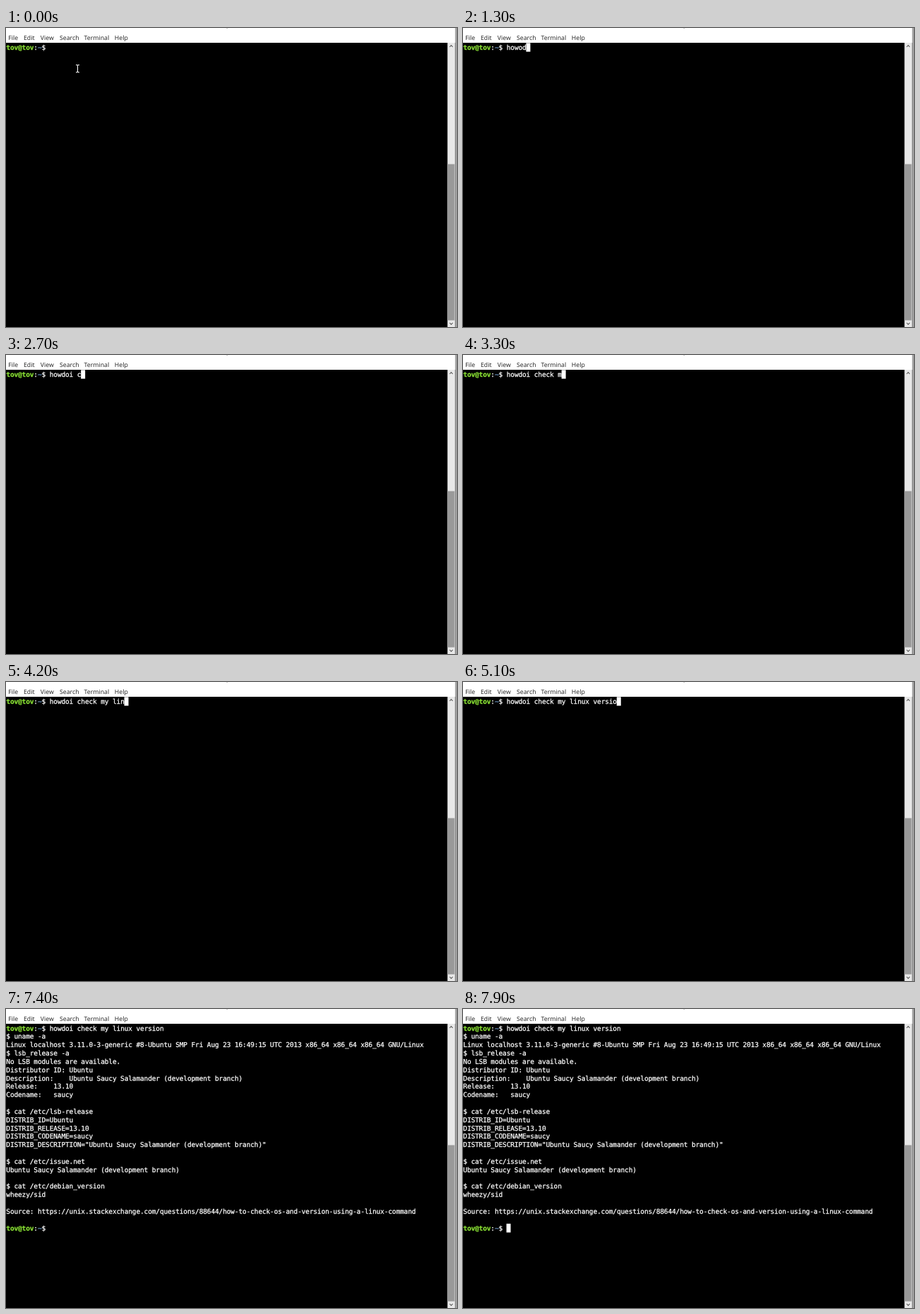
Animation of 639 by 425 pixels, one loop 8 s. Source, as an HTML page:

```html
<!DOCTYPE html>
<html lang="en">
<head>
<meta charset="utf-8">
<title>Terminal</title>
<style>
  html, body { margin: 0; width: 100%; height: 100%; overflow: hidden; background: #000; }
  svg { display: block; width: 639px; height: 425px; }
  text { white-space: pre; text-rendering: geometricPrecision; }
  .menu { font: 8.7px "Noto Sans", sans-serif; fill: #2b2b2b; }
  .term {
    font: 9.5px "DejaVu Sans Mono", monospace; letter-spacing: -.14px;
    fill: #fff; stroke: #fff; stroke-width: .25px;
  }
  .user { font-weight: bold; fill: #8ae234; stroke: #8ae234; }
  .path { fill: #729fcf; stroke: #729fcf; }
</style>
</head>
<body>
<svg viewBox="0 0 639 425">
  <rect width="639" height="425"/>
  <rect width="639" height="21" fill="#fff"/>
  <rect x="312.5" width="1.5" height="1" fill="#bbb"/>
  <g class="menu">
    <text x="3.3" y="16.6">File</text>
    <text x="25" y="16.6">Edit</text>
    <text x="48.8" y="16.6">View</text>
    <text x="76" y="16.6">Search</text>
    <text x="110.6" y="16.6">Terminal</text>
    <text x="153.8" y="16.6">Help</text>
  </g>

  <g id="scrollbar">
    <rect x="625.5" y="21" width="11" height="404" fill="#e8e8e8"/>
    <rect x="625.5" y="193.5" width="10" height="222" fill="#999"/>
    <path d="M628.6 27l2.2-2.4 2.2 2.4M628.6 419l2.2 2.4 2.2-2.4" fill="none" stroke="#555" stroke-width="1.1"/>
    <rect x="636.4" width="2.6" height="425" fill="#a0a0a0"/>
  </g>

  <g class="term" id="term"></g>
  <rect id="caret" width="6" height="12.4" fill="#fff"/>
  <path id="pointer" d="M99 52.5h1.6l.9.8.9-.8H104M101.5 53v9.5M99 63h1.6l.9-.8.9.8H104" fill="none" stroke="#fff" stroke-width="1.1"/>
</svg>
<script>
  const LOOP = 8000, CELL = 5.58, ROW = 11.83, PROMPT = 11;
  const RUN = 5900, OUTPUT = 7400;

  // [time, command line so far]
  const typing = [
    [0, ''], [900, 'h'], [1000, 'how'], [1300, 'howod'], [1600, 'howo'],
    [1900, 'howdo'], [2400, 'howdoi'], [2600, 'howdoi '], [2700, 'howdoi c'],
    [2800, 'howdoi che'], [2900, 'howdoi chec'], [3100, 'howdoi check'],
    [3200, 'howdoi check '], [3300, 'howdoi check m'], [3400, 'howdoi check my '],
    [3700, 'howdoi check my li'], [4200, 'howdoi check my lin'],
    [4400, 'howdoi check my linux'], [4600, 'howdoi check my linux '],
    [4700, 'howdoi check my linux ve'], [4900, 'howdoi check my linux ver'],
    [5000, 'howdoi check my linux vers'], [5100, 'howdoi check my linux versio'],
    [5400, 'howdoi check my linux version']
  ];

  const answer = `$ uname -a
Linux localhost 3.11.0-3-generic #8-Ubuntu SMP Fri Aug 23 16:49:15 UTC 2013 x86_64 x86_64 x86_64 GNU/Linux
$ lsb_release -a
No LSB modules are available.
Distributor ID: Ubuntu
Description:    Ubuntu Saucy Salamander (development branch)
Release:    13.10
Codename:   saucy

$ cat /etc/lsb-release
DISTRIB_ID=Ubuntu
DISTRIB_RELEASE=13.10
DISTRIB_CODENAME=saucy
DISTRIB_DESCRIPTION="Ubuntu Saucy Salamander (development branch)"

$ cat /etc/issue.net
Ubuntu Saucy Salamander (development branch)

$ cat /etc/debian_version
wheezy/sid

Source: https://unix.stackexchange.com/questions/88644/how-to-check-os-and-version-using-a-linux-command
`.split('\n');

  const $ = id => document.getElementById(id);
  const make = (name, parent) =>
    parent.appendChild(document.createElementNS('http://www.w3.org/2000/svg', name));

  function addLine(parent, row, content = '') {
    const line = make('text', parent);
    line.setAttribute('x', 0.3);
    line.setAttribute('y', 30.6 + row * ROW);
    line.textContent = content;
    return line;
  }

  function addPrompt(parent, row) {
    const line = addLine(parent, row);
    const parts = [['tov@tov', 'user'], [':', ''], ['~', 'path'], ['$ ', '']];
    for (const [content, style] of parts) {
      const span = make('tspan', line);
      span.setAttribute('class', style);
      span.textContent = content;
    }
    return make('tspan', line);
  }

  const command = addPrompt($('term'), 0);
  const output = make('g', $('term'));
  answer.forEach((content, i) => addLine(output, i + 1, content));
  const lastRow = answer.length + 1;
  addPrompt(output, lastRow);

  const show = (el, on) => el.setAttribute('visibility', on ? 'visible' : 'hidden');

  function draw(t) {
    const typed = typing.filter(([start]) => start <= t).pop()[1];
    if (command.textContent !== typed) command.textContent = typed;

    let col = PROMPT + typed.length, row = 0;
    if (t >= OUTPUT) { col = PROMPT; row = lastRow; }
    else if (t >= RUN) { col = 0; row = 1; }
    $('caret').setAttribute('x', 0.15 + col * CELL);
    $('caret').setAttribute('y', 21.3 + row * ROW);

    const blinkedOff = t < 600 || (t >= 6400 && t < 6900) || (t >= OUTPUT && t < 7900);
    show($('caret'), !blinkedOff);
    show($('pointer'), t < 900);
    show(output, t >= OUTPUT);
  }

  function tick() {
    draw(performance.now() % LOOP);
    requestAnimationFrame(tick);
  }
  tick();
</script>
</body>
</html>
```
